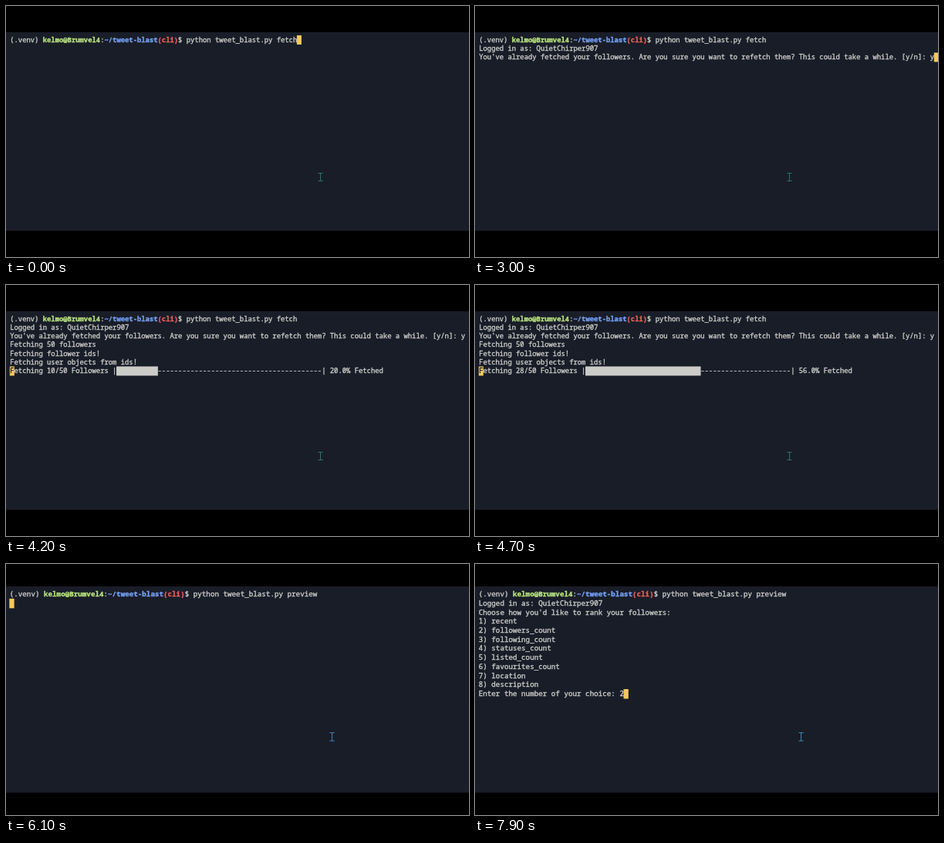
Recreate the animation shown at these times as an HTML page with a canvas. Size 600 px wide and 325 px high, loop 8 s.

```html
<!DOCTYPE html>
<html lang="en">
<head>
<meta charset="utf-8">
<title>Terminal session</title>
<style>
  html, body { margin: 0; width: 100%; height: 100%; overflow: hidden; background: #000; }
  canvas { position: absolute; left: 0; top: 0; }
</style>
</head>
<body>
<canvas id="fetch" width="600" height="325"></canvas>
<canvas id="preview" width="600" height="325"></canvas>
<script>
const LOOP = 8000, STEP = 100;
const FADE_START = 5600, FADE_TIME = 500;
const BACK = "#191d28", TEXT = "#cbccc8", CURSOR = "#f6c95c";

// One character cell in drawing units; a 100px monospace font is 60 units wide.
const CELL_W = 60, CELL_H = 127, UNIT = 5.315 / CELL_W, BASELINE = 94;
const BLEED = 4, TEXT_WEIGHT = 4;

const PROMPT = [
  ["(.venv) ", TEXT],
  ["kelmo@Brumvel4", "#b8e37f", true],
  [":", TEXT],
  ["~/tweet-blast", "#73a0f5", true],
  ["(cli)", "#f05f59", true],
  ["$ ", TEXT],
];
const prompt = PROMPT.map(([part]) => part).join("");
const command = prompt + "python tweet_blast.py ";
const login = "Logged in as: QuietChirper907\n";
const choices = ["recent", "followers_count", "following_count", "statuses_count",
  "listed_count", "favourites_count", "location", "description"];

function progress(t) {
  const n = Math.min(50, Math.floor((t - 3900) / 28.5));
  return `Fetching ${n}/50 Followers |${"█".repeat(n)}${"-".repeat(50 - n)}| ` +
    `${(n * 2).toFixed(1)}% Fetched\r`;
}

// Output in order: [time, text or function of time].
const fetchLog = [
  [0, command + "fetch"],
  [100, "\n"],
  [2000, login],
  [2100, "You've already fetched your followers. Are you sure you want to refetch them? " +
    "This could take a while. [y/n]: "],
  [3000, "y"],
  [3100, "\n"],
  [3200, "Fetching 50 followers\nFetching follower ids!\n"],
  [3400, "Fetching user objects from ids!\n"],
  [4000, progress],
  [5400, "\nDone!\n"],
  [5500, prompt],
];
const previewLog = [
  [0, command + "preview\n"],
  [6900, login],
  [7000, "Choose how you'd like to rank your followers:\n" +
    choices.map((name, i) => `${i + 1}) ${name}\n`).join("") +
    "Enter the number of your choice: "],
  [7600, "2"],
];

const scenes = [
  { id: "fetch", log: fetchLog, x: 0, y: 34, zoom: 1, pointer: [407.5, 187.5], pointerColor: "#2a746e" },
  { id: "preview", log: previewLog, x: -0.7, y: 29, zoom: 1.0415, pointer: [406.4, 187], pointerColor: "#3f86b0" },
];
for (const scene of scenes) {
  scene.canvas = document.getElementById(scene.id);
  scene.ctx = scene.canvas.getContext("2d");
}

function write(ctx, text, col, row, color, bold) {
  const x = col * CELL_W, y = row * CELL_H + BASELINE;
  ctx.font = `${bold ? "bold " : ""}100px "Noto Sans Mono", monospace`;
  ctx.fillStyle = ctx.strokeStyle = color;
  ctx.lineWidth = TEXT_WEIGHT;
  ctx.lineJoin = "round";
  ctx.fillText(text, x, y);
  ctx.strokeText(text, x, y);
}

function block(ctx, col, row, count, color) {
  ctx.fillStyle = color;
  ctx.fillRect(col * CELL_W - BLEED, row * CELL_H - BLEED,
    count * CELL_W + 2 * BLEED, CELL_H + 2 * BLEED);
}

function drawLine(ctx, line, row) {
  let col = 0;
  if (line.startsWith(prompt)) {
    for (const [part, color, bold] of PROMPT) {
      write(ctx, part, col, row, color, bold);
      col += part.length;
    }
  }
  const filled = line.split("█").length - 1;
  if (filled) block(ctx, line.indexOf("█"), row, filled, TEXT);
  write(ctx, line.slice(col).replace(/█/g, " ").replace("\r", ""), col, row, TEXT);
}

function drawCursor(ctx, line, row) {
  const returned = line.endsWith("\r");
  block(ctx, returned ? 0 : line.length, row, 1, CURSOR);
  if (returned) write(ctx, line[0], 0, row, BACK);
}

function drawPointer(ctx, [x, y], color) {
  ctx.strokeStyle = color;
  ctx.lineWidth = 1;
  ctx.beginPath();
  for (const end of [-5, 5]) {
    ctx.moveTo(x - 3, y + end);
    ctx.lineTo(x + 3, y + end);
  }
  ctx.moveTo(x, y - 5);
  ctx.lineTo(x, y + 5);
  ctx.stroke();
}

function drawScene({ ctx, log, x, y, zoom, pointer, pointerColor }, t) {
  ctx.setTransform(1, 0, 0, 1, 0, 0);
  ctx.fillStyle = "#000";
  ctx.fillRect(0, 0, 600, 325);
  ctx.fillStyle = BACK;
  ctx.fillRect(0, y, 600, Math.floor(257 * zoom));

  ctx.setTransform(zoom, 0, 0, zoom, x, y);
  drawPointer(ctx, pointer, pointerColor);

  ctx.translate(5.2, 4.3);
  ctx.scale(UNIT, UNIT);
  const lines = log.filter(([at]) => t >= at)
    .map(([, out]) => typeof out === "function" ? out(t) : out)
    .join("").split("\n");
  lines.forEach((line, row) => drawLine(ctx, line, row));
  drawCursor(ctx, lines[lines.length - 1], lines.length - 1);
}

const start = performance.now();
function frame() {
  const elapsed = (performance.now() - start) % LOOP;
  const t = Math.floor(elapsed / STEP) * STEP;
  const fade = Math.min(1, Math.max(0, (t - FADE_START) / FADE_TIME));
  for (const scene of scenes) drawScene(scene, t);
  scenes[1].canvas.style.opacity = fade;
  requestAnimationFrame(frame);
}
frame();
</script>
</body>
</html>
```
